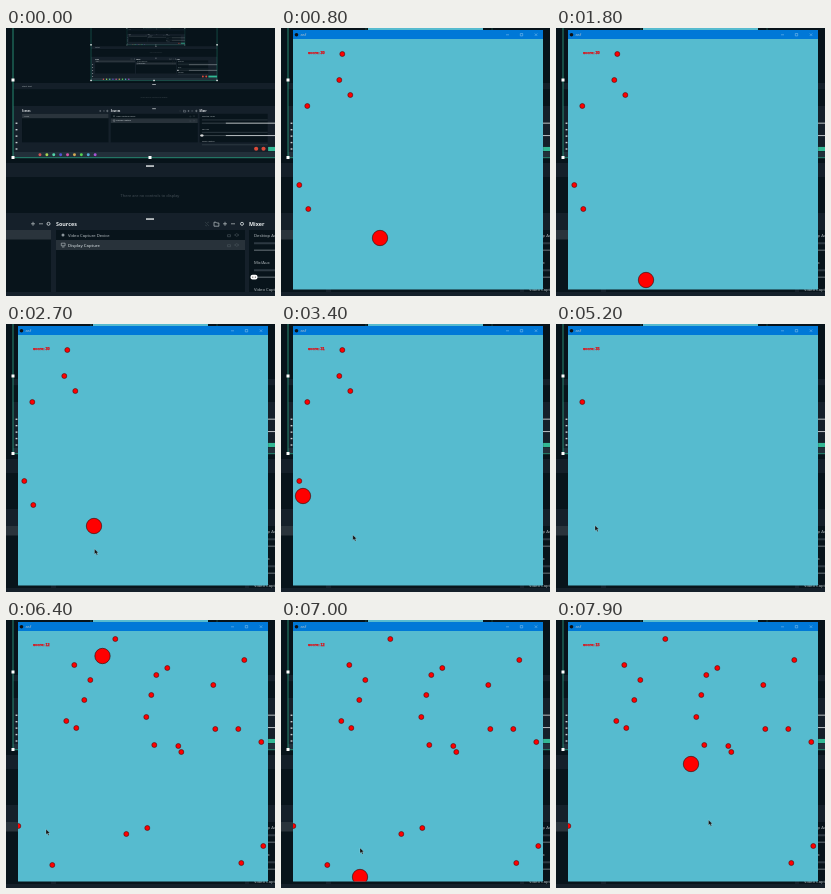
Write an HTML page that moves like this. It is 269x268 px and loops after 8 s.

```html
<!DOCTYPE html>
<html lang="en">
<head>
<meta charset="utf-8">
<title>Red ball game</title>
<style>
html, body { margin: 0; width: 100%; height: 100%; overflow: hidden; background: #07131a; }
svg { display: block; width: 100vw; height: 100vh; }
text { font-family: "Open Sans", "Noto Sans", sans-serif; fill: #bcc4c8; }
#score { font: 700 3.8px "Liberation Sans", Arial, sans-serif; fill: #e5060d; stroke: #e5060d; stroke-width: .25; }
</style>
</head>
<body>
<svg viewBox="0 0 269 268">
  <defs>
    <clipPath id="client"><rect x="12" y="11" width="250" height="250.5"/></clipPath>
    <clipPath id="canvas"><rect x="7" y="-10" width="274" height="139.5"/></clipPath>
  </defs>
  <g id="desktop"></g>
  <g id="game">
    <rect x="87" width="115" height="2.5" fill="#56bbcf"/>
    <rect x="12" y="2" width="250" height="259.5" fill="#56bbcf"/>
    <rect x="12" y="2" width="250" height="9" fill="#0078d7"/>
    <circle cx="15.5" cy="6.7" r="1.8" fill="#111"/>
    <text x="19.5" y="8.3" font-size="4.2">asf</text>
    <path d="M225 6.8h3M239.3 5.5h2.4v2.4h-2.4zM253.8 5.5l2.4 2.4m0-2.4l-2.4 2.4" fill="none" stroke="#8fc6ee" stroke-width=".5"/>
    <g clip-path="url(#client)">
      <g id="dots" fill="#f00" stroke="#4a0d10" stroke-width=".6"></g>
      <circle id="ball" r="7.7" fill="#f00" stroke="#25090a" stroke-width=".6"/>
    </g>
    <text id="score" x="27" y="26.4"></text>
    <path id="cursor" d="M0 0V5.2L1.3 4.1L2.3 6.2L3.2 5.8L2.3 3.8H3.9Z" fill="#111" stroke="#d9eef2" stroke-width=".25"/>
  </g>
</svg>
<script>
const NS = 'http://www.w3.org/2000/svg';
const LOOP = 8000, STEP = 100;
const $ = id => document.getElementById(id);

function add(parent, tag, attrs = {}, text = '') {
  const el = document.createElementNS(NS, tag);
  for (const k in attrs) el.setAttribute(k, attrs[k]);
  if (text) el.textContent = text;
  parent.appendChild(el);
  return el;
}

// The recorder captures its own screen, so its preview repeats the whole desktop.
// Coordinates reach beyond the stage because the copies show more of the screen.
function drawDesktop(g, depth) {
  const rect = (x, y, width, height, fill) => add(g, 'rect', { x, y, width, height, fill });
  const line = (d, stroke, width = .7) => add(g, 'path', { d, stroke, 'stroke-width': width, fill: 'none' });
  const circle = (cx, cy, r, fill) => add(g, 'circle', { cx, cy, r, fill });
  const label = (x, y, str, size = 4.2, extra) => add(g, 'text', { x, y, 'font-size': size, ...extra }, str);
  const title = (x, str) => label(x, 198, str, 5.4, { 'font-weight': 700, style: 'fill:#e6eaec' });
  const icons = (x, y) => line(`M${x} ${y}h4m-2-2v4M${x + 8} ${y}h4`, '#bcc4c8');
  const gear = x => add(g, 'circle', { cx: x, cy: 195.8, r: 1.5, fill: 'none', stroke: '#bcc4c8' });

  rect(-163, -20, 600, 320, '#07131a');
  if (depth > 0) {
    const canvas = add(g, 'g', { 'clip-path': 'url(#canvas)' });
    drawDesktop(add(canvas, 'g', { transform: 'translate(81.8 -7.1) scale(.46)' }), depth - 1);
  }
  line('M7 -10V129.7H281V-10', '#2fa889', .8);
  for (const x of [7, 144, 281])
    for (const y of [52, 129.5]) if (x !== 144 || y > 52) rect(x - 1.5, y - 1.5, 3, 3, '#fff');

  rect(-163, 135, 600, 14, '#141f29');
  rect(-163, 149, 600, 36, '#08141b');
  rect(-163, 185, 600, 100, '#15202a');
  for (const y of [137.3, 190.3]) rect(140, y, 8, 1.5, '#d9dee0');
  label(-143, 144, 'Start text', 5);
  label(144, 168.6, 'There are no controls to display', 4, { 'text-anchor': 'middle', style: 'fill:#465158' });

  const docks = [[-143, 188, 'Scenes'], [50, 189, 'Sources'], [243, 148, 'Mixer']];
  for (const [x, width, name] of docks) {
    rect(x, 202, width, 62, '#08141b');
    title(x, name);
  }
  icons(25, 195.8); gear(42.5);
  icons(217, 195.8); gear(236);
  line('M208 194.2h2l.7.8h2.2v3.2h-4.9z', '#bcc4c8');
  line('M199 194l4 4m-4-1l2 1m2-4l-2 1', '#3c474e', .6);

  rect(-143, 202, 188, 9.5, '#2a343c');
  rect(50, 212, 189, 10, '#28323a');
  label(-139, 209, 'Scene');
  label(62, 208.9, 'Video Capture Device');
  label(62, 218.7, 'Display Capture', 4.2, { 'font-weight': 600 });
  circle(57, 207, 1.5, '#8b959b');
  line('M55.3 215.2h3.8v2.6h-3.8zM56 219h2.4', '#bcc4c8', .6);
  for (const y of [207, 217])
    line(`M221.5 ${y - .3}h3v2h-3zM228.5 ${y}q2.2-2.6 4.4 0q-2.2 2.6-4.4 0z`, '#49545b', .6);

  ['Desktop Audio', 'Mic/Aux', 'Video Capture'].forEach((name, i) => {
    const y = 209.3 + 27 * i;
    label(248, y, name);
    line(`M248 ${y + 6}H391`, '#2d3942', 2);
    if (i > 1) return;
    line(`M248 ${y + 13}H300`, '#49545b', 1.6);
    line(`M300 ${y + 13}H437`, '#dfe4e6', 1.8);
  });
  add(g, 'rect', { x: 244.5, y: 246.8, width: 7, height: 4.6, rx: 2, fill: '#fff' });
  for (const x of [246.8, 249.3]) circle(x, 249.1, .6, '#333');

  for (const x of [366, 382]) circle(x, 278, 4.5, '#db4a38');
  rect(392, 274, 45, 9, '#32b894');
  rect(-163, 285, 600, 12, '#22303a');
  for (let i = 0; i < 9; i++) circle(-104 + 15 * i, 291, 3.2, `hsl(${i * 80} 60% 58%)`);
  for (let i = 0; i < 5; i++) rect(-157, 221 + 14 * i, 4, 3, '#c9d0d3');
}
drawDesktop($('desktop'), 4);

const TOTAL = 36, REACH = 10.6;
const rounds = [
  { from: 100, to: 5500, dots: [[61, 26], [58, 52], [69, 67], [26, 78], [18, 157], [27, 181]] },
  { from: 5500, to: LOOP, dots: [
    [109, 19], [68, 45], [84, 60], [78, 80], [60, 101], [70, 108], [150, 55], [161, 48],
    [145, 75], [140, 97], [148, 125], [172, 126], [175, 132], [238, 40], [207, 65], [209, 109],
    [232, 109], [255, 122], [12, 206], [257, 226], [235, 243], [46, 245], [120, 214], [141, 208]] }
];

// Turning points: time, x, y
const ballPath = [
  [100, 102, 252], [800, 99, 210], [1800, 90, 252], [2700, 88, 202], [3400, 22, 172], [4000, 43, 116],
  [4700, 86, -20], [6200, 97, -20], [6600, 96, 92], [7000, 79, 257], [7250, 52, 250], [7700, 135, 205], [7900, 135, 144]
];
const cursorPath = [
  [2700, 88.5, 225], [4000, 57.5, 199], [5200, 39, 201.5], [5700, 27, 203],
  [6200, 27, 203], [7000, 79, 228], [7900, 152.5, 200]
];

function at(path, t) {
  const i = path.findIndex(p => p[0] > t);
  const b = path.at(i), a = i > 0 ? path[i - 1] : b;
  const u = a === b ? 0 : (t - a[0]) / (b[0] - a[0]);
  return [1, 2].map(n => a[n] + (b[n] - a[n]) * u);
}

// A dot is gone from the moment the ball first touches it
function touchTime([x, y], { from, to }) {
  for (let t = from; t < to; t += 10) {
    const [bx, by] = at(ballPath, t);
    if (Math.hypot(bx - x, by - y) < REACH) return t;
  }
  return Infinity;
}
for (const r of rounds)
  r.items = r.dots.map(d => ({
    el: add($('dots'), 'circle', { cx: d[0] + .3, cy: d[1], r: 2.5 }),
    gone: touchTime(d, r)
  }));

const place = (el, [x, y]) => el.setAttribute('transform', `translate(${x} ${y})`);
const show = (el, on) => el.setAttribute('display', on ? 'inline' : 'none');

function draw(time) {
  const t = Math.floor((time % LOOP) / STEP) * STEP;
  show($('game'), t >= 100);
  for (const { from, to, items } of rounds) {
    const active = t >= from && t < to;
    const left = items.filter(d => d.gone > t);
    for (const d of items) show(d.el, active && left.includes(d));
    if (active) $('score').textContent = `score: ${TOTAL - left.length}`;
  }
  place($('ball'), at(ballPath, t));
  place($('cursor'), at(cursorPath, t));
  show($('cursor'), t >= 1900 && (t < 6000 || t >= 6200));
}

const start = performance.now();
function tick() {
  draw(performance.now() - start);
  requestAnimationFrame(tick);
}
tick();
</script>
</body>
</html>
```
